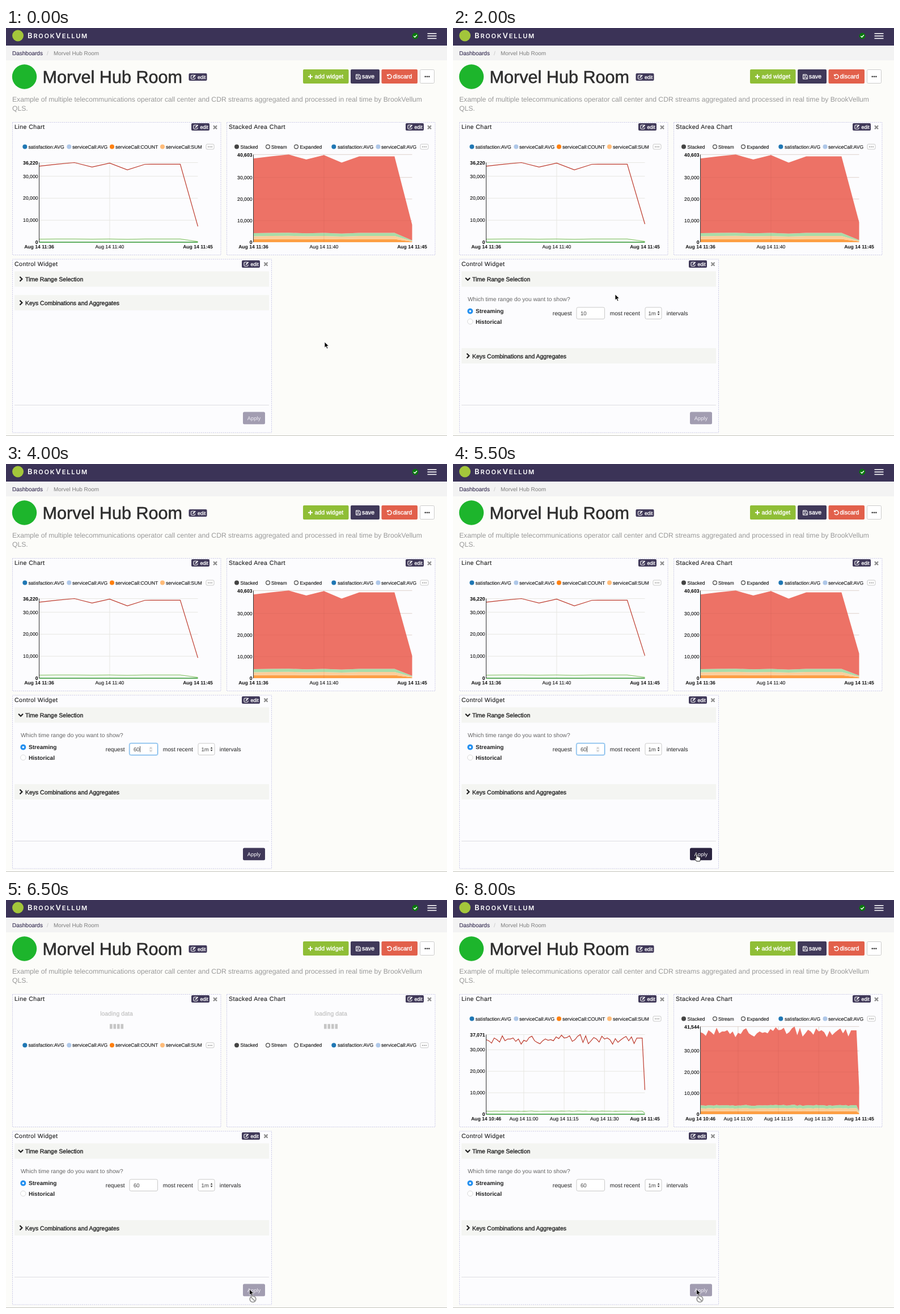
Animation of 778x720 px, one loop 8.5 s. Source, as an HTML page:

```html
<!DOCTYPE html>
<html lang="en">
<head>
<meta charset="utf-8">
<title>Dashboard</title>
<style>
  html, body { margin: 0; width: 100%; height: 100%; overflow: hidden; background: #fcfcf9; }
  svg { display: block; }
  text { font-family: "Liberation Sans", Arial, sans-serif; white-space: pre; text-rendering: geometricPrecision; }
  .brand { font-family: Inter, "Open Sans", sans-serif; font-weight: 600; letter-spacing: 1.8px; }
  .head { letter-spacing: .45px; }
</style>
</head>
<body>
<svg width="778" height="720" viewBox="0 0 778 720">
  <g id="page"></g>
  <g id="live"></g>
</svg>
<script>
const STEP = 500, COUNT = 17;
const INK = '#222', PURPLE = '#403959', PANEL = '#f4f5f2';
const BLUE = '#1f77b4', PALE = '#aec7e8', ORANGE = '#ff7f0e', PEACH = '#ffbb78';

// SVG helpers
const attrs = o => Object.entries(o).map(([k, v]) => ` ${k}="${v}"`).join('');
const text = (s, x, y, size, fill = INK, o = {}) =>
  `<text x="${x}" y="${y}" font-size="${size}" fill="${fill}"${attrs(o)}>${s}</text>`;
const rect = (x, y, w, h, fill, o = {}) =>
  `<rect x="${x}" y="${y}" width="${w}" height="${h}" fill="${fill}"${attrs(o)}/>`;
const dot = (x, y, r, fill, o = {}) => `<circle cx="${x}" cy="${y}" r="${r}" fill="${fill}"${attrs(o)}/>`;
const path = (d, stroke, width = 1, fill = 'none', o = {}) =>
  `<path d="${d}" fill="${fill}" stroke="${stroke}" stroke-width="${width}"${attrs(o)}/>`;
const at = (x, y, s) => `<g transform="translate(${x} ${y})">${s}</g>`;
const bold = { 'font-weight': 'bold' };
const medium = (color, width = .3) => ({ stroke: color, 'stroke-width': width });
const middle = { 'text-anchor': 'middle' };

const editBadge = (x, y) => at(x, y,
  rect(0, 0, 32, 13, PURPLE, { rx: 2 }) +
  path('M9.5 3.3H5.5q-1.5 0-1.5 1.5v4q0 1.5 1.5 1.5h4q1.5 0 1.5-1.5V7.5', '#fff', 1.1) +
  path('M7.1 7.6 11.5 3.2', '#fff', 1.9) +
  text('edit', 15.4, 9.7, 8.8, '#fff', medium('#fff')));

const closeMark = (x, y) => path(`M${x - 3} ${y - 3}l6 6m0-6l-6 6`, '#8d8d8d', 2.3);

const widget = (title, x, y, w, h) =>
  rect(x + .5, y + .5, w, h, '#fcfcfe', { stroke: '#c9c8e6', 'stroke-dasharray': '2 1.5' }) +
  text(title, x + 4, y + 12.3, 10.6, INK, { class: 'head', ...medium(INK, .15) }) +
  editBadge(Math.floor(x + w - 51.5), Math.floor(y + 2.5)) + closeMark(x + w - 9.5, y + 9.3);

const more = (x, y) => rect(x, y - 4.5, 14, 9, '#fff', { rx: 2, stroke: '#bbb', 'stroke-width': .8 }) +
  [4, 7, 10].map(d => dot(x + d, y + .3, .75, '#444')).join('');

const chevron = (x, y, open) =>
  path(open ? `M${x - 4} ${y - 2}l4 4 4-4` : `M${x - 1.6} ${y - 4}l4 4-4 4`, INK, 2.2);

function drawPage() {
  let s = rect(0, 0, 778, 31, '#3b3357') + rect(0, 31, 778, 26, '#f3f3f3');
  s += dot(21, 13.5, 10, '#a3c63b');
  s += `<text class="brand" x="38" y="18" font-size="11" fill="#fff"><tspan font-size="13">B</tspan>ROOK<tspan font-size="13">V</tspan>ELLUM</text>`;
  s += dot(722, 14, 5.4, '#08780c') + path('M719.3 14.2l2 2 3.6-4', '#fff', 1.5);
  s += [9, 13.3, 17.6].map(y => rect(743.5, y, 16, 1.6, '#fff')).join('');

  s += text('Dashboards', 11, 47.5, 10, '#3b3357', medium('#3b3357', .15)) + text('/', 72, 47.5, 10, '#c4c4c4');
  s += text('Morvel Hub Room', 84, 47.5, 9.95, '#7d7d7d');

  s += dot(32.5, 86, 21.7, '#1db52c') + text('Morvel Hub Room', 64.5, 97.3, 30.6, '#2e2e2e', medium('#2e2e2e', .6));
  s += editBadge(322.5, 80);
  s += text('Example of multiple telecommunications operator call center and CDR streams aggregated and processed in real time by BrookVellum',
    11, 130, 12.16, '#999') + text('QLS.', 11, 146.3, 12.16, '#999');

  const button = (x, w, fill, label, lx) =>
    rect(x, 73, w, 25, fill, { rx: 2 }) + text(label, lx, 89.2, 10.5, '#fff', medium('#fff', .35));
  s += button(524, 80.5, '#8fbe36', 'add widget', 544.5) + path('M533 85.7h8m-4-4v8', '#fff', 2);
  s += button(608, 51, PURPLE, 'save', 628);
  s += path('M617.5 82h6l2 2v6h-8zM619.3 82v2.6h3.6V82M619.3 90v-3h4.4v3', '#fff', 1);
  s += button(662.5, 63.5, '#e2604b', 'discard', 682.5);
  s += path('M673.7 83.2a3.7 3.7 0 1 1-.6 4.3', '#fff', 1.5) + path('M672 81v4h4z', 'none', 0, '#fff');
  s += rect(730.5, 73.5, 25, 24, '#fff', { rx: 2, stroke: '#ccc' });
  s += [739.7, 743, 746.3].map(x => dot(x, 85.7, 1.2, '#222')).join('');

  s += widget('Line Chart', 11, 166, 367.5, 234) + widget('Stacked Area Chart', 389, 166, 367.5, 234);
  s += widget('Control Widget', 11, 407.5, 457, 306);
  s += rect(15, 429.5, 449, 27, PANEL) + rect(15, 665, 449, 1, '#dedee2');
  s += rect(0, 719, 778, 1, '#c4c4bc');
  return s;
}

function legends(y) {
  const item = (label, x, tx, fill, open) =>
    dot(x, y, open ? 3.4 : 4, fill, open ? medium('#444', 1.2) : {}) +
    text(label, tx, y + 3, 8.65, '#111', medium('#111', .12));
  return item('satisfaction:AVG', 33.3, 39.5, BLUE) + item('serviceCall:AVG', 111.3, 117, PALE) +
    item('serviceCall:COUNT', 187, 193, ORANGE) + item('serviceCall:SUM', 276, 282, PEACH) + more(353, y) +
    item('Stacked', 407, 413.5, '#444') + item('Stream', 462, 468, '#fff', true) +
    item('Expanded', 512, 518.5, '#fff', true) + item('satisfaction:AVG', 578.3, 585, BLUE) +
    item('serviceCall:AVG', 656.5, 662, PALE) + more(731, y);
}

// Per-minute sums, in hundreds; the open last minute is added later
const hour = [347, 342, 331, 355, 347, 336, 365, 342, 350, 350, 355, 339, 350, 326, 344, 339, 357, 363, 342, 334,
  328, 342, 350, 344, 347, 342, 360, 352, 368, 355, 357, 365, 339, 347, 363, 370.71, 334, 365, 328, 342,
  357, 350, 336, 363, 350, 355, 347, 326, 352, 334.5,
  345.7, 354.7, 362.2, 341.8, 359.9, 329, 354.5, 354.6, 354.8];
const BASE = 378, WIDTH = 280, SHARE = .0404, TOTAL = 1.121;

function chart(left, top, max, data, ticks, stacked) {
  const px = i => left + WIDTH * i / (data.length - 1);
  const py = v => BASE - (BASE - top) * v / max;
  const pts = k => data.map((v, i) => `${px(i).toFixed(1)} ${py(v * k).toFixed(1)}`);
  const line = (k, color, w) => path('M' + pts(k).join('L'), color, w);
  const band = (lo, hi, fill) =>
    path(`M${pts(hi).join('L')}L${pts(lo).reverse().join('L')}Z`, 'none', 0, fill);
  const inner = ticks.slice(1, -1);
  const rows = [10000, 20000, 30000];
  const grid = (color, op) =>
    path([...rows, max].map(v => `M${left} ${py(v).toFixed(1)}h${WIDTH}`).join('') +
      inner.map(([i]) => `M${px(i).toFixed(1)} ${top}V${BASE}`).join(''), color, 1, 'none', { opacity: op });
  let s = grid('#e7e7e2', 1);
  if (stacked) {
    s += band(0, SHARE, '#fd9f45') + band(SHARE, SHARE * 2, '#fbce9b') +
      band(SHARE * 2, SHARE * 3, '#a9dca8') + band(SHARE * 3, TOTAL, '#ed7266') + grid('#a04038', .12);
  } else {
    s += line(SHARE, '#8fc873', 1.2) + line(0, '#2c942c', 1.6) + line(1, '#bd3a2c', 1.2);
  }
  s += path(`M${left} ${top}V${BASE}`, '#333', 1);
  const end = { 'text-anchor': 'end' };
  const thin = medium('#111', .12);
  s += rows.map(v => text(v.toLocaleString('en-US'), left - 2, py(v) + 3, 8.65, '#111', { ...end, ...thin })).join('');
  s += text(max.toLocaleString('en-US'), left - 2, top + 3.3, 8.65, '#000', { ...end, ...bold });
  s += text('0', left - 2, BASE + 3, 8.65, '#000', { ...end, ...bold });
  s += ticks.map(([i, label], n) => text('Aug 14 ' + label, px(i), 389, 8.65, '#111',
    { ...middle, ...(n % (ticks.length - 1) ? thin : bold) })).join('');
  return s;
}

function charts(n) {
  if (n === 12 || n === 13) {
    const wait = x => text('loading data', x, 204, 10.6, '#c6c6c6', { ...middle, ...medium('#c6c6c6') }) +
      [0, 1, 2, 3].map(i => rect(x - 12 + i * 6.5, 218.8, 4.6, 8.6, '#c6c6c6')).join('');
    return wait(195) + wait(573) + legends(256.3);
  }
  const full = n === 16;
  const size = full ? 60 : n > 13 ? 11 : 10;
  const last = full ? 11300 : n < 2 ? 7200 : n < 7 ? 8250 : n < 10 ? 9250 : 10200;
  const data = [...hour.slice(60 - size).map(v => v * 100), last];
  const ticks = full
    ? [[0, '10:46'], [14, '11:00'], [29, '11:15'], [44, '11:30'], [59, '11:45']]
    : [[0, size > 10 ? '11:35' : '11:36'], [size - 6, '11:40'], [size - 1, '11:45']];
  return legends(209.5) + chart(58.5, 237.5, full ? 37071 : 36220, data, ticks, false) +
    chart(436.5, 223.3, full ? 41544 : 40603, data, ticks, true);
}

function controls(n) {
  const open = n >= 3, shown = n >= 4, focus = n >= 5 && n < 12;
  const hover = n === 3;
  const value = n < 7 ? '10' : n === 7 ? '6' : '60';
  const keysY = shown ? 578.5 : 484.8;
  const title = (s, y) => text(s, 34, y + 3.8, 10.45, INK, medium(INK, .35));
  const label = (s, x) => text(s, x, 506.6, 10.15);
  let s = chevron(26, 443, open) + title('Time Range Selection', 443.3);
  if (hover) s += rect(31, 448.2, 105, .9, INK);
  s += rect(15, keysY - 13.5, 449, 27, PANEL) + chevron(26, keysY, false) +
    title('Keys Combinations and Aggregates', keysY + .2);

  if (shown) {
    s += text('Which time range do you want to show?', 26, 482, 10.2, '#666');
    s += dot(30.3, 499.7, 5, '#2490f0') + dot(30.3, 499.7, 1.8, '#fff');
    s += dot(30.3, 518, 4.7, '#fff', medium('#cfcfcf', .8));
    s += text('Streaming', 40, 503.4, 10.1, INK, bold) + text('Historical', 40, 521.5, 10.1, INK, bold);
    s += label('request', 175.8) + label('most recent', 276.8) + label('intervals', 376.8);
    if (focus) s += rect(216.5, 491.5, 52.5, 23.5, '#d3e8fa', { rx: 4 });
    s += rect(218, 493, 49.5, 20.5, '#fff', { rx: 2.5, stroke: focus ? '#5fa8e6' : '#c9c9c9' });
    if (n === 6) s += rect(224.5, 497, 11.5, 12.5, '#b4d6fb');
    s += text(value, 225, 506.6, 9.6, '#444');
    if (focus) {
      if (n > 6) s += rect(n === 7 ? 230.7 : 236, 498, .8, 10.5, '#222');
      s += rect(252.5, 498.5, 6, 10.5, '#f2f2f2', { rx: 2 });
      s += path('M254.1 502.2l1.4-1.6 1.4 1.6m-2.8 3.2l1.4 1.6 1.4-1.6', '#888', .8);
    }
    s += rect(339, 493, 29, 20.5, '#fff', { rx: 2.5, stroke: '#c9c9c9' }) + text('1m', 344.5, 506.6, 9.6, '#444');
    s += path('M360.7 502.2l1.9-2.7 1.9 2.7zM360.7 504.3l1.9 2.7 1.9-2.7z', 'none', 0, '#333');
  }
  const active = n >= 7 && n < 12;
  s += rect(418, 677.5, 39, 21.7, !active ? '#a29db1' : n >= 10 ? '#2b2440' : PURPLE, { rx: 2.5 });
  return s + text('Apply', 437.5, 691.8, 9.3, active ? '#fff' : '#efedf4', middle);
}

const arrow = path('M0 0V10.2l2.4-2.2 1.8 4.1 1.8-.8-1.8-4h3.3z', '#fff', .8, '#000');
const cursors = {
  arrow,
  hand: path('M-1.2 1.3q0-1.3 1.2-1.3t1.2 1.3V5q1.8-.5 1.9.6 1.7-.5 1.8.7 1.6-.3 1.6.9V9.3q0 1.7-1 3.7H-.4Q-1.8 10.4-4 8.2q.4-1.7 2.8.2z',
    '#111', 1, '#fff'),
  beam: path('M-2.5-6Q0-6 0-4.5 0-6 2.5-6M0-4.5v9M-2.5 6Q0 6 0 4.5 0 6 2.5 6M-1.5 1.5h3', '#111', 1.3),
  denied: dot(6, 17.3, 5.3, '#fff', medium('#999', 1.8)) + path('M2.4 13.7l7.2 7.2', '#999', 1.8) + arrow,
};

// First step of each pointer pose
const poses = [
  [0, 'arrow', 562, 554], [1, 'arrow', 545, 546], [2, 'arrow', 380, 470], [3, 'hand', 320, 446],
  [4, 'arrow', 286, 470], [5, 'beam', 233, 503], [6, 'beam', 231, 503.5], [7, null],
  [9, 'arrow', 335, 604], [10, 'hand', 430, 688], [12, 'denied', 429.5, 687],
];

function pointer(n) {
  const [, kind, x, y] = poses.filter(p => p[0] <= n).pop();
  return kind ? at(x, y, cursors[kind]) : '';
}

const live = document.getElementById('live');
document.getElementById('page').innerHTML = drawPage();
const start = performance.now();
let current = -1;

function tick() {
  const n = Math.floor((performance.now() - start) / STEP) % COUNT;
  if (n !== current) {
    current = n;
    live.innerHTML = charts(n) + controls(n) + pointer(n);
  }
  requestAnimationFrame(tick);
}
tick();
</script>
</body>
</html>
```
